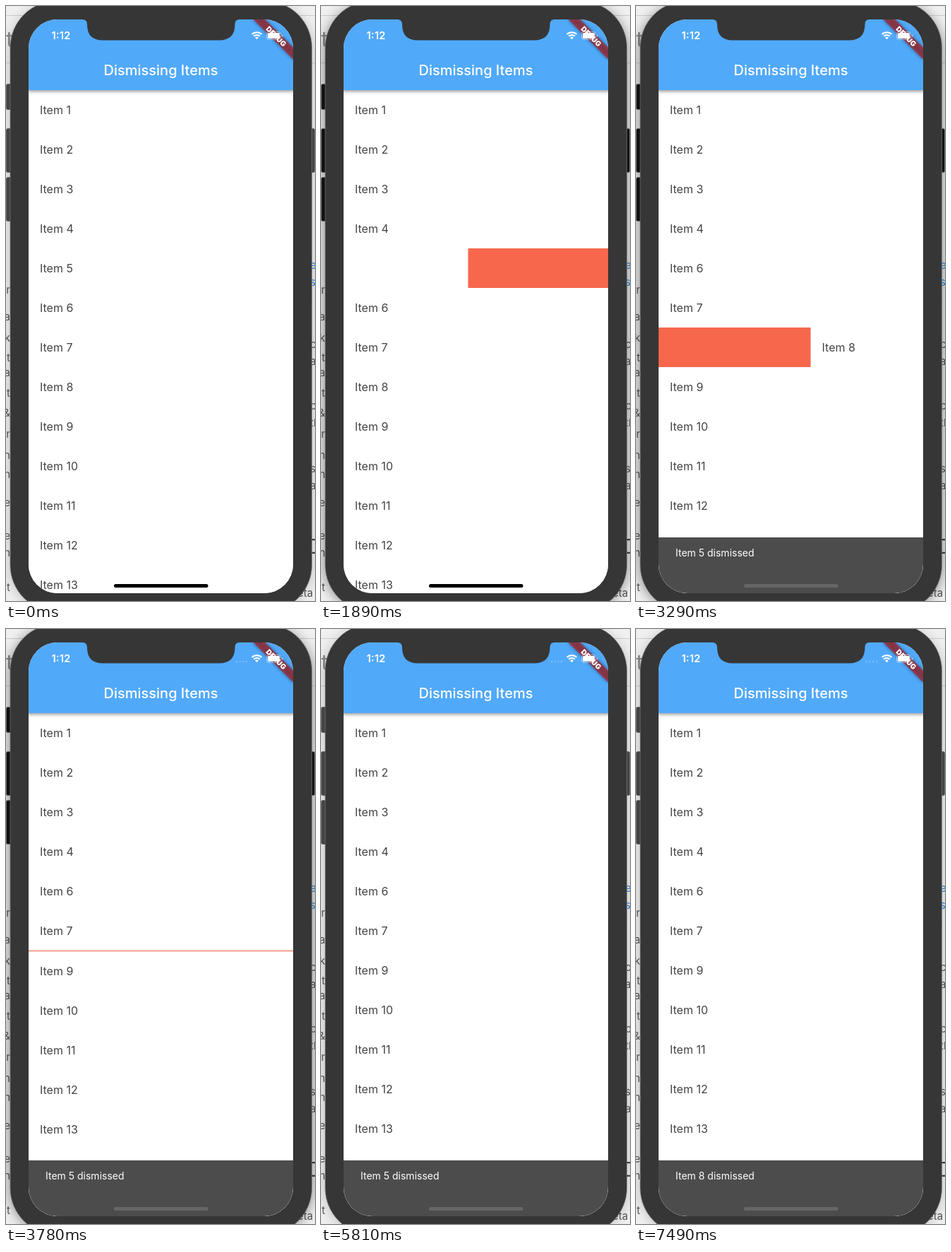
Write an HTML page that moves like this. It is 438 by 842 pixels and loops after 7630 ms.

```html
<!DOCTYPE html>
<html lang="en">
<head>
<meta charset="utf-8">
<title>Dismissing Items</title>
<style>
html, body { margin: 0; width: 100%; height: 100%; overflow: hidden; background: #f0f0f0; }
svg { display: block; font-family: Inter, Roboto, sans-serif; }
#page { font-size: 15px; fill: #555; }
#rows text { font-size: 16px; fill: #444; }
</style>
</head>
<body>
<svg width="438" height="842" viewBox="0 0 438 842">
  <defs>
    <clipPath id="screen"><rect x="32" y="19" width="375" height="812" rx="41"/></clipPath>
    <filter id="blur" x="-20%" y="-20%" width="140%" height="140%"><feGaussianBlur stdDeviation="9"/></filter>
    <filter id="soft" x="-20%" y="-60%" width="140%" height="220%"><feGaussianBlur stdDeviation="2.5"/></filter>
  </defs>

  <g id="page">
    <rect width="438" height="842" fill="#f0f0f0"/>
    <path d="M0 13.5H438M0 80.5H438" stroke="#ccc"/>
    <text x="10" y="58" font-size="30" text-anchor="end" fill="#888">t</text>
    <text x="428" y="775" font-size="28" fill="#444">D</text>
    <text x="413" y="836">eta</text>
  </g>
  <rect id="shade" x="4" y="-4" width="431" height="862" rx="68" filter="url(#blur)"/>
  <g id="buttons" stroke="#666">
    <rect x="0.5" y="110.5" width="12" height="36" rx="2"/>
    <rect x="0.5" y="173.5" width="12" height="62" rx="2"/>
    <rect x="0.5" y="242.5" width="12" height="62" rx="2"/>
    <rect x="426.5" y="173.5" width="11" height="62" rx="2"/>
  </g>
  <rect x="6" y="-7" width="427.5" height="864" rx="66" fill="#363636" stroke="#777" stroke-width=".7"/>

  <g clip-path="url(#screen)">
    <rect x="32" y="19" width="375" height="812" fill="#fff"/>
    <g id="rows"></g>
    <rect x="30" y="90" width="379" height="31" opacity=".4" filter="url(#soft)"/>
    <rect x="32" y="19" width="375" height="100" fill="#51a9fa"/>
    <text x="219.5" y="98" font-size="20" font-weight="500" text-anchor="middle" fill="#fff">Dismissing Items</text>
    <g id="snack">
      <rect x="32" width="375" height="80" fill="#4c4c4c"/>
      <text id="note" x="56" y="27" font-size="14" fill="#fff"></text>
    </g>
    <rect id="home" x="153" y="818" width="133.500" height="5" rx="2.500"/>
    <g transform="translate(407 19) rotate(45)">
      <rect x="-40" y="28" width="80" height="12" opacity=".45" filter="url(#soft)"/>
      <rect x="-40" y="28" width="80" height="12" fill="#b71c1c" opacity=".63"/>
      <text y="37.700" font-size="10.200" font-weight="900" text-anchor="middle" fill="#fff">DEBUG</text>
    </g>
    <g fill="#fff">
      <text x="64.500" y="47" font-size="15" font-weight="600">1:12</text>
      <g id="dots"></g>
      <path d="M355.500 47.300l-2.400-2.500a3.400 3.400 0 0 1 4.800 0z"/>
      <path d="M351.200 42.800a6 6 0 0 1 8.600 0M348.600 40a9.800 9.800 0 0 1 13.800 0" fill="none" stroke="#fff" stroke-width="2"/>
      <rect x="371" y="38" width="17" height="8" rx="1.500"/>
      <rect x="369.500" y="36.500" width="20" height="11" rx="3" fill="none" stroke="#fff" stroke-opacity=".5"/>
      <rect x="391" y="40" width="1.500" height="4" rx=".7" opacity=".5"/>
    </g>
  </g>
  <path d="M108 17V19Q115 19 115 26Q115 48.500 137 48.500H302Q324.500 48.500 324.500 26Q324.500 19 331 19V17Z" fill="#363636"/>
</svg>
<script>
const LOOP = 7630, STEP = 70, ROW = 56, WIDTH = 375, SNACK = 79, BOTTOM = 831;
const $ = id => document.getElementById(id);
const clamp = v => Math.max(0, Math.min(1, v));
const span = (t, a, b) => clamp((t - a) / (b - a));
const smooth = p => p * p * (3 - 2 * p);

function bezier(x1, y1, x2, y2) {
  const at = (a, b, u) => 3 * a * u * (1 - u) ** 2 + 3 * b * u * u * (1 - u) + u ** 3;
  return x => {
    let lo = 0, hi = 1;
    for (let i = 0; i < 20; i++) {
      const mid = (lo + hi) / 2;
      if (at(x1, x2, mid) < x) lo = mid; else hi = mid;
    }
    return at(y1, y2, (lo + hi) / 2);
  };
}
const ease = bezier(.25, .1, .25, 1), fastOut = bezier(.4, 0, .2, 1);

function add(parent, name, attrs, text = "") {
  const el = document.createElementNS("http://www.w3.org/2000/svg", name);
  set(el, attrs);
  el.textContent = text;
  return parent.appendChild(el);
}
function set(el, attrs) {
  for (const k in attrs) el.setAttribute(k, attrs[k]);
}

// Word ends that show on both sides of the phone
const left = { 407: "r", 445: "a", 475: "ck", 503: "t", 524: "na", 553: "at", 581: "&", 611: "r",
  641: "ch", 668: "n", 708: "e", 755: "ce", 779: "n", 828: "t" };
const right = { 372: "e", 396: "s", 420: "i", 484: "c", 508: "a", 571: "p", 595: "th", 660: "s:", 684: "a" };
for (const y in left) add($("page"), "text", { x: 6, y, "text-anchor": "end" }, left[y]);
for (const y in right) add($("page"), "text", { x: 431, y, fill: y < 430 ? "#2a86dd" : "#555" }, right[y]);

const swipes = {
  5: { start: 1625, end: 2135, dir: -1 },
  8: { start: 3015, end: 3515, dir: 1 }
};
const rows = [];
for (let n = 1; n <= 15; n++) {
  const g = add($("rows"), "g", {}), swipe = swipes[n];
  const back = swipe && add(g, "rect", { x: 32, width: WIDTH, fill: "#f6674c" });
  const tile = add(g, "g", {});
  add(tile, "rect", { x: 32, width: WIDTH, height: ROW, fill: "#fff" });
  add(tile, "text", { x: 48, y: 34 }, "Item " + n);
  rows.push({ g, back, tile, swipe });
}
const dots = [0, 1, 2, 3].map(i => add($("dots"), "circle", { cx: 327 + i * 4.7, cy: 46, r: 1 }));

function drawRows(t) {
  let y = 119;
  for (const { g, back, tile, swipe } of rows) {
    let height = ROW;
    set(g, { transform: `translate(0 ${y})` });
    if (swipe) {
      const moved = smooth(span(t, swipe.start, swipe.end));
      height *= 1 - ease(span(t, swipe.end + 120, swipe.end + 300));
      set(tile, { transform: `translate(${swipe.dir * moved * WIDTH} 0)`,
        visibility: moved < 1 ? "visible" : "hidden" });
      set(back, { height, visibility: moved > 0 ? "visible" : "hidden" });
    }
    y += height;
  }
}

function drawSnack(t) {
  const second = t >= 6935;
  const p = second ? span(t, 6935, 7185) : Math.min(span(t, 2435, 2685), 1 - span(t, 6685, 6935));
  const height = SNACK * fastOut(p);
  set($("snack"), { transform: `translate(0 ${BOTTOM - height})` });
  set($("note"), { opacity: fastOut(span(p, .72, 1)) });
  $("note").textContent = `Item ${second ? 8 : 5} dismissed`;
  set($("home"), { fill: height > 12 ? "#666" : "#000" });
}

function draw(t) {
  drawRows(t);
  drawSnack(t);
  const focused = t >= 1050 && t < 5320;
  set($("shade"), { opacity: focused ? .42 : .2 });
  set($("buttons"), { fill: focused ? "#111" : "#444" });
  const phase = t % 1000;
  dots.forEach((dot, i) => set(dot, {
    opacity: .35 * span(phase, 300 + i * 20, 400 + i * 20) * (1 - span(phase, 815, 880))
  }));
}

function tick() {
  const t = performance.now() % LOOP;
  draw(Math.floor(t / STEP) * STEP);
  requestAnimationFrame(tick);
}
tick();
</script>
</body>
</html>
```
